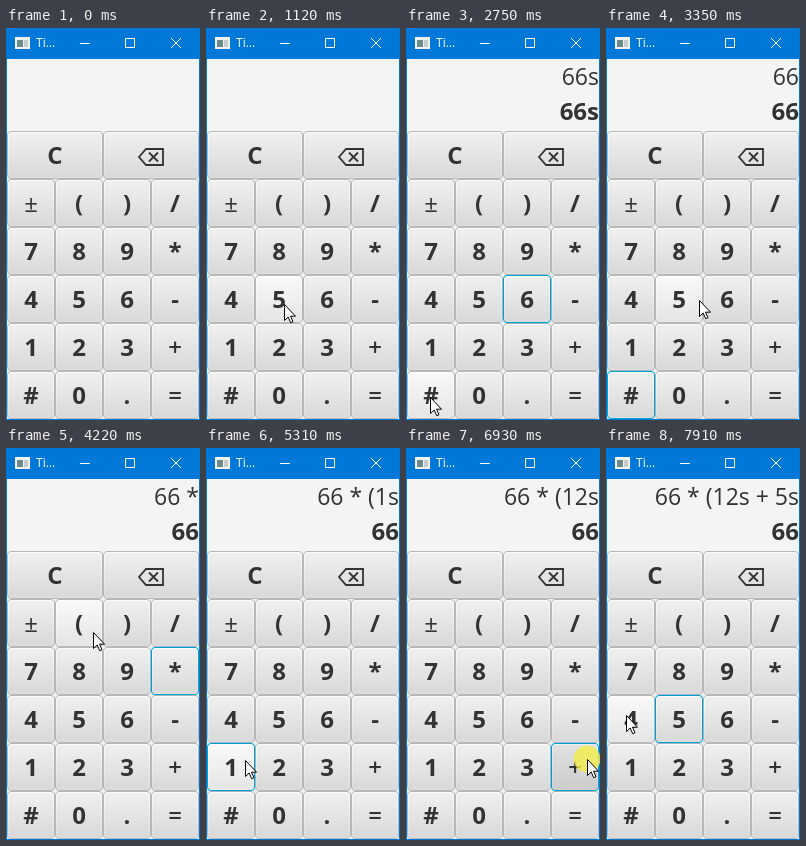
Recreate the animation shown at these times as an HTML page. Size 194x392 px, loop 7990 ms.

```html
<!DOCTYPE html>
<html lang="en">
<head>
<meta charset="utf-8">
<title>Time calculator</title>
<style>
  html, body { margin: 0; width: 100%; height: 100%; overflow: hidden; }
  body { background: #0078d7; font: 24px "Open Sans", "Noto Sans", sans-serif; color: #333; }
  #win { position: relative; width: 194px; height: 392px; overflow: hidden; background: #0078d7; }
  #pane { position: absolute; left: 1px; top: 31px; width: 192px; height: 360px; background: #f4f4f4; }
  #bar, #top { position: absolute; left: 0; top: 0; }
  #name { position: absolute; left: 30px; top: 0; font-size: 12px; line-height: 30px; color: #fff; }
  .line { position: absolute; right: 0; line-height: 36px; white-space: pre; }
  #expr { top: -1px; font-size: 23px; }
  #sum { top: 34px; font-weight: 700; }
  #keys { position: absolute; top: 72px; display: grid; grid-template: repeat(6, 48px) / repeat(4, 48px); }
  .key {
    --a: #efefef; --b: #d9d9d9; --hi: #fcfcfc; --lo: #dfdfdf;
    box-sizing: border-box; padding: 1px; border: 1px solid #b7b7b7; border-radius: 4px;
    background: linear-gradient(var(--a), var(--b)) content-box, linear-gradient(var(--hi), var(--lo)) padding-box;
    text-align: center; font-weight: 700; line-height: 44px;
  }
  .wide { grid-column: span 2; }
  .thin { font-weight: 400; }
  .semi { font-weight: 600; }
  .hover { --a: #f9f9f9; --b: #e5e5e5; --hi: #fff; --lo: #ebebeb; }
  .down { --a: #e1e1e1; --b: #cccccc; --hi: #efefef; --lo: #d2d2d2; }
  .focus { border-color: #039ed3; box-shadow: 0 0 0 1px #039ed322; position: relative; }
  .key svg { display: block; margin: 14px auto 0; }
</style>
</head>
<body>
<div id="win">
  <svg id="bar" width="194" height="31" fill="none" stroke="#fff">
    <path d="M9 9h15v12h-15z" fill="#f2f2f2" stroke="none"/>
    <path d="M11 12h6v7h-6z" fill="#6f8a8a" stroke="none"/>
    <path d="M18 12h4v7h-4z" fill="#c4cccc" stroke="none"/>
    <path d="M74 15.5h10M119.500 10.500h9v9h-9zM165 10l10 10M175 10l-10 10"/>
  </svg>
  <div id="name">Ti...</div>
  <div id="pane">
    <div id="expr" class="line"></div>
    <div id="sum" class="line"></div>
    <div id="keys"></div>
  </div>
  <svg id="top" width="194" height="392">
    <g id="mouse">
      <circle id="spot" r="13.500" fill="#f2ee4a" fill-opacity=".8"/>
      <path d="M.5 .5v16l3.700-3.500 2.500 5.700 2.300-1-2.500-5.500h5z" fill="#fff" stroke="#000"/>
    </g>
  </svg>
</div>
<script>
const LOOP = 7990;
const $ = id => document.getElementById(id);

const ERASE = '<svg width="28" height="20" fill="none" stroke="#333" stroke-width="1.8">' +
  '<path d="M2 10l7-8h17v16h-17zM12 5.500l9 9M21 5.500l-9 9"/></svg>';
const labels = ['C', ERASE, ...'±()/789*456-123+#0.='];
const weight = { '±': 'thin', '+': 'semi', '=': 'semi' };
const keys = labels.map((label, i) => {
  const key = document.createElement('div');
  key.base = 'key ' + (i < 2 ? 'wide' : weight[label] || '');
  key.innerHTML = label;
  $('keys').append(key);
  return key;
});

// first step, last step, number of steps, destination
const moves = [
  [50, 50, 1, 107, 311], [120, 120, 1, 63, 301], [430, 660, 4, 17, 290],
  [810, 1350, 8, 114, 267], [2360, 2750, 6, 24, 369], [3190, 3350, 3, 93, 272],
  [3430, 3740, 5, 165, 222], [4060, 4220, 3, 87, 184], [4600, 4760, 3, 27, 308],
  [5240, 5390, 3, 64, 319], [5770, 6230, 7, 170, 262], [6460, 6620, 3, 181, 311],
  [7080, 7300, 4, 74, 266], [7680, 7910, 4, 20, 267]
];

// press, release, key, expression, result
const clicks = [
  [1750, 1900, '6', '6s', '6s'], [2130, 2290, '6', '66s', '66s'],
  [2960, 3110, '#', '66', '66'], [3820, 3980, '*', '66 *', '66'],
  [4370, 4600, '(', '66 * (', '66'], [4920, 5240, '1', '66 * (1s', '66'],
  [5540, 5770, '2', '66 * (12s', '66'], [6930, 7080, '+', '66 * (12s +', '66'],
  [7530, 7680, '5', '66 * (12s + 5s', '66']
];

function pointer(t) {
  let [x, y] = moves[0].slice(3);
  for (const [start, end, steps, toX, toY] of moves) {
    if (t < start) break;
    const gap = (end - start) / (steps - 1) || 1;
    const p = Math.min(1, (Math.floor((t - start) / gap + 0.01) + 1) / steps);
    x += (toX - x) * p;
    y += (toY - y) * p;
  }
  return [x, y];
}

function draw(t) {
  const shown = t >= moves[0][0];
  const [x, y] = pointer(t);
  let expr = '', sum = '', focus = '', down = false;
  for (const [press, release, key, text, result] of clicks) {
    if (t < press) break;
    focus = key;
    down = t < release;
    if (!down) [expr, sum] = [text, result];
  }
  const under = 2 + Math.floor((y - 151) / 48) * 4 + Math.floor((x - 1) / 48);
  keys.forEach((key, i) => {
    const over = shown && i === under;
    key.className = key.base + (over ? down ? ' down' : ' hover' : '') +
      (labels[i] === focus ? ' focus' : '');
  });
  $('expr').textContent = expr;
  $('sum').textContent = sum;
  $('mouse').setAttribute('visibility', shown ? 'visible' : 'hidden');
  $('mouse').setAttribute('transform', `translate(${Math.round(x)} ${Math.round(y)})`);
  $('spot').setAttribute('opacity', down ? 1 : 0);
}

const began = performance.now();
function tick() {
  draw((performance.now() - began) % LOOP);
  requestAnimationFrame(tick);
}
tick();
</script>
</body>
</html>
```
